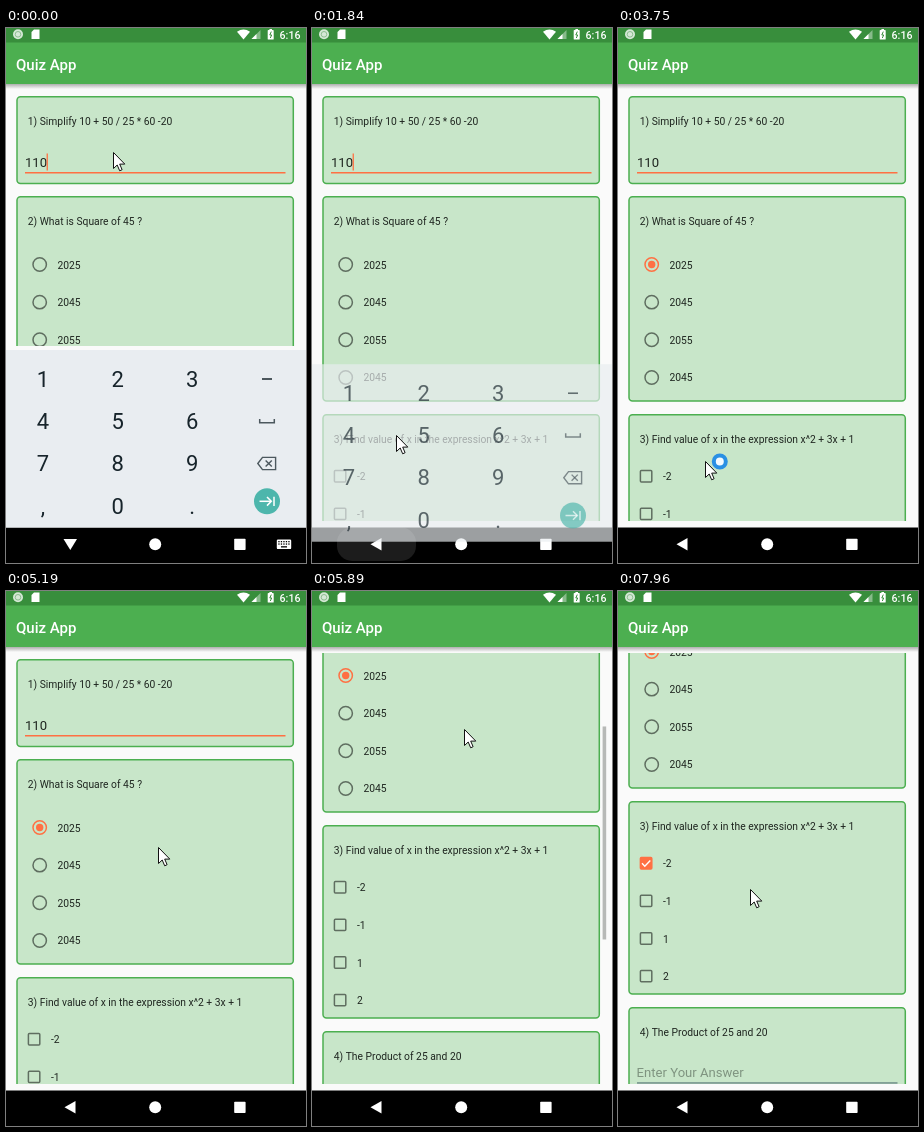
Recreate the animation shown at these times as an HTML page with a canvas. Size 300x535 px, loop 8000 ms.

```html
<!DOCTYPE html>
<html>
<head>
<meta charset="utf-8">
<style>
html, body { margin: 0; width: 100%; height: 100%; overflow: hidden; background: #fafafa; }
canvas { display: block; }
</style>
</head>
<body>
<canvas id="stage" width="300" height="535"></canvas>
<script>
const g = document.getElementById('stage').getContext('2d');
const LOOP = 8000;
const GREEN = '#4caf50', PALE = '#c8e6c9', ORANGE = '#ff7043', INK = '#1f2620', GREY = '#5f6e60';
const ROW = 37.65, NAV = 499.5;

// Moments (ms) of the user's actions
const BACK = 1590, PICK = 3170, DRAG = 5300, NUDGE = 6440, CHECK = 7560;

// Pointer moves: start, end, destination
const MOVES = [
  [280, 720, 98, 91], [730, 1290, 64, 514], [BACK, 1835, 84, 407], [1960, 2640, 55, 250], [2650, 2770, 38, 237],
  [PICK, 3730, 87, 433], [3980, 5180, 152, 256], [DRAG, 5880, 152, 138], [NUDGE, 7010, 27, 280], [CHECK, 7955, 132, 298]
];

// Smooth step from 0 to 1 between two times
function ease(t, from, to) {
  const u = Math.min(1, Math.max(0, (t - from) / (to - from)));
  return u * u * (3 - 2 * u);
}

function text(str, x, y, size = 10.3, color = INK, weight = 400, align = 'left') {
  g.font = `${weight} ${size}px Roboto, sans-serif`;
  g.textAlign = align;
  g.fillStyle = color;
  g.fillText(str, x, Math.round(y));
}
function rect(x, y, w, h, color) {
  g.fillStyle = color;
  g.fillRect(x, y, w, h);
}
function shape(build, fill, stroke, width = 1.5) {
  g.beginPath();
  build();
  if (fill) { g.fillStyle = fill; g.fill(); }
  if (stroke) { g.strokeStyle = stroke; g.lineWidth = width; g.stroke(); }
}
const line = (...pts) => () => pts.forEach(([x, y], i) => i ? g.lineTo(x, y) : g.moveTo(x, y));
const poly = (...pts) => () => { line(...pts)(); g.closePath(); };
const disc = (x, y, r) => () => g.arc(x, y, r, 0, 7);
const round = (x, y, w, h, r) => () => g.roundRect(x, y, w, h, r);

function card(top, height, title) {
  shape(round(11, top + 0.7, 276.3, height - 1.6, 3.5), PALE, GREEN);
  text(title, 21.8, top + 28.8);
}
function radio(y, label, on) {
  shape(disc(33.7, y, 6.7), null, on ? ORANGE : GREY);
  if (on) shape(disc(33.7, y, 3.7), ORANGE);
  text(label, 51.4, y + 4);
}
function checkbox(y, label, on) {
  shape(round(22.4, y - 5.8, 11.4, 11.4, 1), on ? ORANGE : null, on ? ORANGE : GREY);
  if (on) shape(line([24, y], [26.8, y + 2.9], [32.3, y - 2.8]), null, '#fff', 1.4);
  text(label, 45, y + 4);
}

function page(t) {
  const scroll = 152 * ease(t, DRAG, 5880) + 24 * ease(t, NUDGE, 6720);
  const bottom = t < BACK + 110 ? 318 : 493;
  g.save();
  g.beginPath();
  g.rect(0, 62, 300, bottom - 62);
  g.clip();
  g.translate(0, -scroll);

  card(68, 88.5, '1) Simplify 10 + 50 / 25 * 60 -20');
  text('110', 19, 139, 13.1);
  rect(19, 144, 260.5, 1.5, ORANGE);
  const caretOn = (t + 480) % 1560 < 1060;
  if (t < PICK && caretOn) rect(40.6, 125.5, 1.3, 17, ORANGE);

  card(168, 206, '2) What is Square of 45 ?');
  ['2025', '2045', '2055', '2045'].forEach((s, i) => radio(236.5 + i * ROW, s, !i && t >= PICK));

  card(386, 194, '3) Find value of x in the expression x^2 + 3x + 1');
  ['-2', '-1', '1', '2'].forEach((s, i) => checkbox(448.3 + i * ROW, s, !i && t >= CHECK));

  card(592, 88.5, '4) The Product of 25 and 20');
  text('Enter Your Answer', 18.6, 662, 13.1, '#7f9480');
  rect(19, 667.2, 260.5, 1.5, '#72908a');
  g.restore();

  g.globalAlpha = ease(t, DRAG, DRAG + 100) - ease(t, 7140, 7290);
  rect(290.6, 61 + scroll * 0.49, 3.6, 213, '#b7b9b7');
  g.globalAlpha = 1;
}

function topBars() {
  const shade = g.createLinearGradient(0, 56, 0, 61);
  shade.addColorStop(0, 'rgba(0,0,0,.3)');
  shade.addColorStop(1, 'rgba(0,0,0,0)');
  rect(0, 56, 300, 5, shade);
  rect(0, 14, 300, 42, GREEN);
  rect(0, 0, 300, 14.5, '#388e3c');
  text('Quiz App', 10, 42, 15, '#fff', 500);

  shape(disc(12, 6.3, 5), '#d5e8d6');
  shape(disc(12, 6.3, 2.8), null, '#8dbd90', 1);
  shape(poly([28, 1.5], [33.5, 1.5], [33.5, 11], [25.5, 11], [25.5, 4]), '#fff');
  shape(() => { g.moveTo(237.5, 11.5); g.lineTo(231, 3.8); g.quadraticCurveTo(237.5, -0.8, 244, 3.8); }, '#fff');
  shape(poly([245.5, 11], [254.5, 11], [254.5, 2]), 'rgba(255,255,255,.4)');
  shape(poly([245.5, 11], [250.5, 11], [250.5, 6]), '#fff');
  rect(263.4, 1, 2.6, 2, '#fff');
  shape(round(261.7, 2, 6, 9.6, 0.7), '#fff');
  shape(line([265.3, 3.6], [263.8, 7], [265.7, 7], [264.3, 10]), null, '#388e3c', 1);
  text('6:16', 273.6, 11, 10.6, '#fff', 500);
}

function navBar(t) {
  rect(0, NAV, 300, 36, '#000');
  const press = ease(t, 1290, BACK) - ease(t, 1960, 2370);
  shape(round(25, NAV, 79, 33.5, 15), `rgba(255,255,255,${0.11 * press})`);
  shape(disc(149.2, 516.2, 6), '#fff');
  shape(round(228.2, 510.7, 11.4, 11.4, 0.8), '#fff');
  if (t >= BACK + 110) {
    shape(poly([58.5, 516.2], [69.5, 510], [69.5, 522.4]), '#fff');
    return;
  }
  shape(poly([57.5, 511], [71, 511], [64.3, 522]), '#fff');
  shape(round(270.8, 511.5, 14.4, 9.6, 1.2), '#fff');
  for (let i = 0; i < 10; i++) rect(272.3 + i % 5 * 2.5, i < 5 ? 513 : 515.4, 1.3, 1.3, '#000');
  rect(275, 518.2, 6, 1.3, '#000');
}

function keyboard(t) {
  const icon = '#4c585e';
  g.save();
  g.globalAlpha = 1 - ease(t, 1660, 2130);
  g.translate(0, 30 * ease(t, BACK, 2110));
  rect(0, 322, 300, NAV - 322, '#e9edf1');
  ['123', '456', '789', ',0.'].forEach((row, r) => [...row].forEach((key, c) =>
    text(key, 37 + c * 74.6, 358.5 + r * 42.4, 22, '#17242b', 400, 'center')));
  rect(256, 350.2, 10, 1.6, '#26333a');
  shape(line([253.7, 391], [253.7, 394.7], [268.3, 394.7], [268.3, 391]), null, icon);
  shape(poly([251.8, 435.5], [256.5, 429.4], [269.6, 429.4], [269.6, 441.6], [256.5, 441.6]), null, icon, 1.4);
  shape(line([259.6, 432.4], [265.8, 438.6]), null, icon, 1.4);
  shape(line([265.8, 432.4], [259.6, 438.6]), null, icon, 1.4);
  shape(disc(261, 473.3, 13), '#4db6ac');
  shape(line([253.5, 473.3], [265, 473.3]), null, '#fff');
  shape(line([261, 469], [265.3, 473.3], [261, 477.6]), null, '#fff');
  shape(line([268, 468.7], [268, 478]), null, '#fff');
  g.restore();
}

function pointer(t) {
  if (t >= 730 && t < 1010) return; // off screen
  let x = 107, y = 124;
  for (const [from, to, toX, toY] of MOVES) {
    const u = ease(t, from, to);
    x += (toX - x) * u;
    y += (toY - y) * u;
  }
  g.save();
  g.translate(Math.round(x) + 0.5, Math.round(y) + 0.5);
  shape(poly([0, 0], [0, 16], [3.7, 12.5], [6.2, 18.3], [8.6, 17.2], [6.2, 11.6], [11.3, 11.6]), '#fff', '#111', 1);
  const busy = t >= 3440 && t < 4140;
  if (busy) shape(disc(14.3, 0, 6), '#f4faff', '#2a90e4', 4);
  g.restore();
}

const start = performance.now();
function frame() {
  const t = (performance.now() - start) % LOOP;
  rect(0, 0, 300, 535, '#fafafa');
  page(t);
  topBars();
  navBar(t);
  keyboard(t);
  pointer(t);
  requestAnimationFrame(frame);
}
frame();
</script>
</body>
</html>
```
